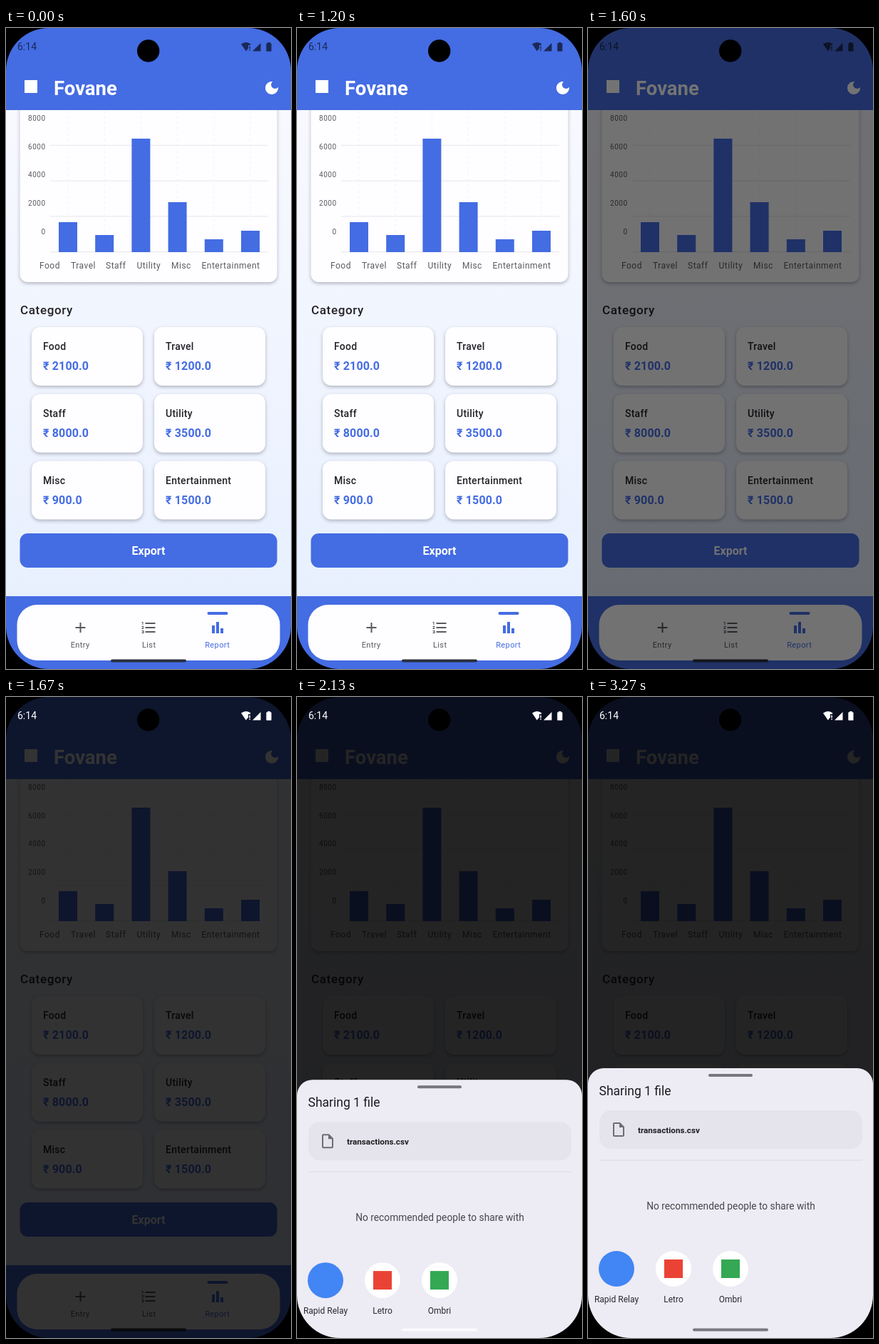
These frames come from a looping animation (400x898 px, 3.34 s). An HTML page:

```html
<!DOCTYPE html>
<html lang="en">
<head>
<meta charset="utf-8">
<title>Expense report</title>
<style>
  html, body { margin: 0; width: 100%; height: 100%; overflow: hidden; background: #000; }
  svg { display: block; width: 100%; height: 100%; font-family: Roboto, sans-serif; }
  .blue { fill: #446ce3; }
  .card { fill: #fefdff; filter: drop-shadow(0 2px 2.5px rgba(60, 60, 75, .36)); }
  .grid { stroke: #e6e6ec; fill: none; }
  .tick { font-size: 10px; letter-spacing: .55px; fill: #5a5960; }
  .axis { font-size: 12px; letter-spacing: .5px; fill: #5a5960; }
  .name { font-size: 14px; font-weight: 500; letter-spacing: .25px; fill: #242329; }
  .sum { font-size: 16px; font-weight: 700; letter-spacing: .15px; }
  .nav { font-size: 11px; letter-spacing: .4px; text-anchor: middle; }
  .app { font-size: 12px; text-anchor: middle; fill: #2a292e; }
</style>
</head>
<body>
<svg viewBox="0 0 400 898" preserveAspectRatio="none">
  <defs>
    <linearGradient id="page" x2="0" y2="1">
      <stop stop-color="#f8f9ff"/><stop offset="1" stop-color="#e8f0fe"/>
    </linearGradient>
  </defs>

  <rect y="115" width="400" height="681" fill="url(#page)"/>
  <rect class="card" x="19.5" y="60" width="361" height="296" rx="11"/>
  <g id="chart"></g>
  <text x="20" y="401" font-size="17" font-weight="500" letter-spacing=".65" fill="#242329">Category</text>
  <g id="cards"></g>
  <rect class="blue" x="19.5" y="708" width="361" height="48" rx="11"/>
  <text x="200" y="738" font-size="16" font-weight="700" text-anchor="middle" fill="#fff">Export</text>

  <rect class="blue" width="400" height="115"/>
  <rect x="26" y="73" width="18" height="18" fill="#fff"/>
  <text x="67" y="93.5" font-size="27.5" font-weight="700" fill="#fff">Fovane</text>
  <path transform="translate(361 72)" fill="#fff" d="M12 3c-4.97 0-9 4.03-9 9s4.03 9 9 9 9-4.03 9-9c0-.46-.04-.92-.1-1.36-.98 1.37-2.58 2.26-4.4 2.26-2.98 0-5.4-2.42-5.4-5.4 0-1.81.89-3.42 2.26-4.4-.44-.06-.9-.1-1.36-.1z"/>

  <rect class="blue" y="796" width="400" height="102"/>
  <rect x="15.5" y="808" width="369" height="78" rx="28" fill="#fefdff"/>
  <g fill="#5a5960">
    <path transform="translate(92.5 828)" d="M19 13h-6v6h-2v-6H5v-2h6V5h2v6h6z"/>
    <path transform="translate(188.5 828)" d="M2 17h2v.5H3v1h1v.5H2v1h3v-4H2zm1-9h1V4H2v1h1zm-1 3h1.8L2 13.1v.9h3v-1H3.2L5 10.9V10H2zm5-6v2h14V5zm0 14h14v-2H7zm0-6h14v-2H7z"/>
    <text class="nav" x="104.2" y="868">Entry</text>
    <text class="nav" x="200.7" y="868">List</text>
  </g>
  <g class="blue">
    <rect x="282.5" y="818" width="29" height="4" rx="2"/>
    <path transform="translate(285 828)" d="M4 9h4v11H4zm12 4h4v7h-4zM10 4h4v16h-4z"/>
    <text class="nav" x="296.7" y="868">Report</text>
  </g>
  <rect x="147" y="884.5" width="106" height="4" rx="2" fill="#2b2f3c"/>

  <rect id="dim" width="400" height="898" opacity="0"/>

  <g id="sheet" transform="translate(0 898)">
    <rect width="400" height="420" rx="22" fill="#edebf4"/>
    <rect x="169" y="8" width="62" height="4" rx="2" fill="#77767d"/>
    <text x="15.5" y="38" font-size="17.5" fill="#1d1c21">Sharing 1 file</text>
    <rect x="16" y="59" width="369" height="54" rx="16" fill="#e5e3eb"/>
    <path transform="translate(31 74)" fill="#6f6d74" d="M14 2H6c-1.1 0-2 .9-2 2v16c0 1.1.9 2 2 2h12c1.1 0 2-.9 2-2V8zM6 20V4h7v5h5v11z"/>
    <text x="70" y="90.5" font-size="11.7" font-weight="700" fill="#1d1c21">transactions.csv</text>
    <path d="M16 129h369" stroke="#e2e0e8" stroke-width="1.5"/>
    <text x="200.5" y="198" font-size="13.75" text-anchor="middle" fill="#47464c">No recommended people to share with</text>
    <circle cx="40" cy="281" r="25" fill="#4285f4"/>
    <circle cx="120" cy="281" r="25" fill="#fff"/>
    <rect x="107" y="268" width="26" height="26" fill="#ea4335"/>
    <circle cx="200" cy="281" r="25" fill="#fff"/>
    <rect x="187" y="268" width="26" height="26" fill="#34a853"/>
    <text class="app" x="40" y="327.5">Rapid Relay</text>
    <text class="app" x="120" y="327.5">Letro</text>
    <text class="app" x="200" y="327.5">Ombri</text>
  </g>

  <g id="status">
    <text x="16" y="31" font-size="14">6:14</text>
    <path d="M330 22.5q7-5 13.5 0l-1 1.5h-2.500v4.5l-3.2 4zM341.3 25.5h1.5v4h-1.5zm0 5h1.5v1.5h-1.5zM346 32.5l11.5-11.5v11.5zM365.3 22q0-.7.7-.7h1.2V20h3.4v1.3h1.2q.7 0 .7.7v10q0 .8-.7.8H366q-.7 0-.7-.8z"/>
  </g>
  <rect id="handle" x="147" y="884.5" width="106" height="4" rx="2"/>
  <circle cx="199.7" cy="32" r="15.7"/>
  <path fill-rule="evenodd" d="M0 0h400v898H0zM60 0A60 60 0 0 0 0 60V838A60 60 0 0 0 60 898H340A60 60 0 0 0 400 838V60A60 60 0 0 0 340 0z"/>
</svg>
<script>
const $ = id => document.getElementById(id);
const text = (cls, x, y, s) => `<text class="${cls}" x="${x}" y="${y}">${s}</text>`;

// label, label x, bar top, amount
const items = [
  ['Food', 47, 272, '2100.0'], ['Travel', 91, 290, '1200.0'],
  ['Staff', 140, 155, '8000.0'], ['Utility', 183.5, 244, '3500.0'],
  ['Misc', 232, 296, '900.0'], ['Entertainment', 274.5, 284, '1500.0']
];

let chart = '', cards = '';
for (let i = 0; i < 5; i++) {
  if (i) chart += `<path class="grid" d="M62 ${114.5 + i * 49.8}h306"/>`;
  chart += text('tick', i < 4 ? 31 : 49.5, 130 + i * 39.7, 8000 - i * 2000);
}
items.forEach(([label, x, top, sum], i) => {
  const barX = 74 + i * 51.2, cardX = 36 + i % 2 * 172, cardY = 419 + (i >> 1) * 93.8;
  chart += `<path class="grid" stroke-dasharray="4 4" opacity=".45" d="M${barX + 13} 115v199"/>
    <rect class="blue" x="${barX}" y="${top}" width="26" height="${314 - top}"/>` + text('axis', x, 337, label);
  cards += `<rect class="card" x="${cardX}" y="${cardY}" width="156" height="82" rx="12"/>` +
    text('name', cardX + 16, cardY + 32, label) +
    text('sum blue', cardX + 16, cardY + 60, '₹ ' + sum);
});
$('chart').innerHTML = chart;
$('cards').innerHTML = cards;

const LOOP = 3340, STEP = 200 / 3;
const dimKeys = [[1467, 0], [1533, .2], [1600, .55], [1667, .8], [1800, .86]];

function dimAt(t) {
  const i = dimKeys.findIndex(k => k[0] > t);
  if (i < 0) return .86;
  if (!i) return 0;
  const [t0, a] = dimKeys[i - 1], [t1, b] = dimKeys[i];
  return a + (b - a) * (t - t0) / (t1 - t0);
}

function draw(now) {
  const t = Math.min(49, Math.floor(now % LOOP / STEP + .1)) * STEP;
  const left = 1 - Math.min(1, Math.max(0, (t - 1743) / 600));
  $('dim').setAttribute('opacity', dimAt(t));
  $('sheet').setAttribute('transform', `translate(0 ${520 + 378 * left ** 3})`);
  $('status').setAttribute('fill', t < 1640 ? 'rgba(0, 0, 0, .62)' : '#fff');
  $('handle').setAttribute('fill', t < 1700 ? 'none' : t < 2190 ? '#faf9fd' : '#7a797f');
}

const start = performance.now();
function tick() {
  draw(performance.now() - start);
  requestAnimationFrame(tick);
}
tick();
</script>
</body>
</html>
```
